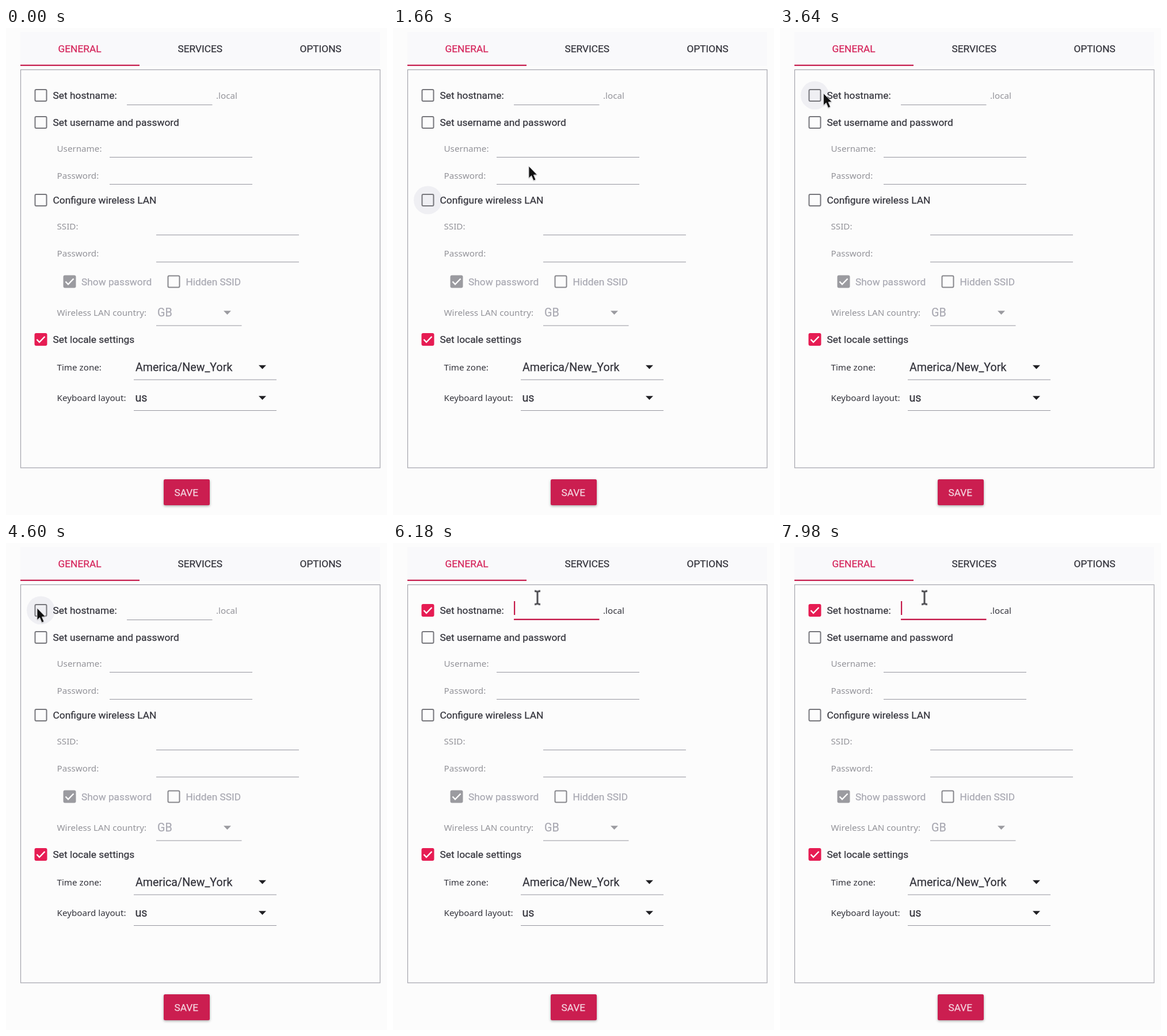
An HTML page with a canvas for the animation above (8000 ms loop, 662 by 846 pixels).

```html
<!DOCTYPE html>
<html lang="en">
<head>
<meta charset="utf-8">
<title>Settings form</title>
<style>
  html, body { margin: 0; width: 100%; height: 100%; overflow: hidden; background: #fcfcfc; }
  canvas { display: block; width: 662px; height: 846px; }
</style>
</head>
<body>
<canvas id="stage" width="662" height="846"></canvas>
<script>
const ctx = document.getElementById('stage').getContext('2d');
const LOOP = 8000, CLICK = 4760, BLINK = 600;
const PINK = '#e61c53', DEEP = '#c51a4a', INK = '#34343c', GREY = '#939399', RULE = '#96969f';
const ROBOTO = 'Roboto, sans-serif', NOTO = '"Noto Sans", sans-serif';

// Pointer waypoints: time, x, y
const PATH = [
  [300, 560, 850], [840, 400, 600], [1300, 300, 405], [1560, 252, 292],
  [1660, 236, 240], [2400, 184, 166], [2800, 152, 121], [3300, 104, 114],
  [3900, 54, 113], [5040, 54, 113], [5480, 158, 100], [5840, 232, 95],
  [6100, 251, 95], [LOOP, 251, 95]
];

// Hover halos: row centre, start, end
const HALOS = [[299, 1480, 1780], [164, 2380, 2860], [117, 2860, 5700]];

function text(s, x, y, size, color, family = ROBOTO, weight = 400) {
  ctx.font = `${weight} ${size}px ${family}`;
  ctx.fillStyle = color;
  ctx.fillText(s, x, y);
  if (family === ROBOTO) {
    ctx.strokeStyle = color;
    ctx.lineWidth = 0.25;
    ctx.strokeText(s, x, y);
  }
}

const row = (s, y) => text(s, 81.5, y, 17.35, INK);
const label = (s, x, y, color = GREY) => text(s, x, y, 15.2, color, NOTO, color === INK ? 500 : 400);

function rule(x1, x2, y, color = RULE, h = 1) {
  ctx.fillStyle = color;
  ctx.fillRect(x1, y, x2 - x1, h);
}

function poly(points, color) {
  ctx.beginPath();
  points.forEach(([x, y]) => ctx.lineTo(x, y));
  ctx.closePath();
  ctx.fillStyle = color;
  ctx.fill();
}

function box(x, y, fill, border = '#77777c') {
  ctx.beginPath();
  ctx.roundRect(x - 10, y - 10, 20, 20, 2);
  ctx.lineWidth = 2;
  ctx.strokeStyle = fill || border;
  ctx.lineJoin = 'round';
  ctx.stroke();
  if (!fill) return;
  ctx.fillStyle = fill;
  ctx.fill();
  ctx.beginPath();
  ctx.moveTo(x - 7, y);
  ctx.lineTo(x - 2.5, y + 4.8);
  ctx.lineTo(x + 7, y - 5);
  ctx.lineWidth = 2.4;
  ctx.lineJoin = 'miter';
  ctx.strokeStyle = '#fff';
  ctx.stroke();
}

function dropArrow(x, y, color) {
  poly([[x - 6.5, y - 3.2], [x + 6.5, y - 3.2], [x, y + 3.5]], color);
}

function tabs() {
  ctx.fillStyle = '#f9f9fb';
  ctx.fillRect(25, 7, 625, 59);
  text('GENERAL', 90.5, 42, 17.3, '#d5265c');
  text('SERVICES', 298.5, 42, 17.3, INK);
  text('OPTIONS', 510.5, 42, 17.3, INK);
  rule(25, 232, 63.7, DEEP, 2.2);
  ctx.strokeStyle = '#a4a4ac';
  ctx.lineWidth = 1.2;
  ctx.strokeRect(25.5, 72.5, 624.5, 691.5);
}

function halos(t) {
  for (const [y, from, to] of HALOS) {
    const a = Math.min((t - from) / 100, (to - t) / 60, 1);
    if (a <= 0) continue;
    ctx.globalAlpha = a;
    ctx.fillStyle = y === 117 && t >= CLICK ? '#fbe0e8' : '#efeff3';
    ctx.beginPath();
    ctx.arc(60.5, y, 24.5, 0, Math.PI * 2);
    ctx.fill();
    ctx.globalAlpha = 1;
  }
}

function form(t) {
  const on = t >= CLICK;
  box(60.5, 117, on && PINK);
  row('Set hostname:', 122.5);
  if (on) {
    rule(210, 358.5, 131.6, DEEP, 2.4);
    if ((t - CLICK) % BLINK < BLINK / 2) rule(210, 212.2, 101, DEEP, 24);
  } else {
    rule(210, 358.5, 133);
  }
  label('.local', 365, 123, on ? INK : GREY);

  box(60.5, 164);
  row('Set username and password', 169.5);
  label('Username:', 88.5, 215);
  rule(180, 428, 224);
  label('Password:', 88.5, 262);
  rule(180, 428, 271);

  box(60.5, 299);
  row('Configure wireless LAN', 305);
  label('SSID:', 88.5, 350);
  rule(261, 509, 359);
  label('Password:', 88.5, 397);
  rule(261, 509, 406);
  box(110.5, 440.5, '#9b9ba0');
  text('Show password', 131, 446.5, 17.3, '#a9a9b2');
  box(291.5, 440.5, null, '#87878c');
  text('Hidden SSID', 312.5, 446.5, 17.3, '#a9a9b2');
  label('Wireless LAN country:', 88.5, 500);
  text('GB', 263, 501, 19.7, '#a9a9b2');
  dropArrow(384.5, 494.5, '#9b9ba0');
  rule(261, 409.5, 516.5);

  box(60.5, 541, PINK);
  row('Set locale settings', 547);
  label('Time zone:', 88.5, 595, INK);
  text('America/New_York', 225, 595.5, 19.7, INK);
  dropArrow(445.5, 589, '#202024');
  rule(222, 470, 610.5);
  label('Keyboard layout:', 88.5, 648, INK);
  text('us', 224.5, 649, 19.7, INK);
  dropArrow(445.5, 642.5, '#202024');
  rule(222, 470, 664);
}

function saveButton() {
  ctx.save();
  ctx.shadowColor = 'rgba(0,0,0,.35)';
  ctx.shadowBlur = 4;
  ctx.shadowOffsetY = 1.5;
  ctx.fillStyle = '#cb1e50';
  ctx.beginPath();
  ctx.roundRect(274, 784, 80, 45, 2.5);
  ctx.fill();
  ctx.restore();
  text('SAVE', 292.5, 812.5, 17.3, '#f3d3de');
}

function pointerAt(t) {
  const i = PATH.findIndex(p => p[0] > t);
  if (i < 1) return null;
  const [t0, x0, y0] = PATH[i - 1], [t1, x1, y1] = PATH[i];
  const k = (t - t0) / (t1 - t0);
  return [x0 + (x1 - x0) * k, y0 + (y1 - y0) * k];
}

function arrow() {
  const shape = [[0, 0], [0, 21], [4.6, 16.6], [8.2, 25.2], [12, 23.6], [8.5, 15.3], [14.5, 15]];
  ctx.save();
  ctx.shadowColor = 'rgba(0,0,0,.3)';
  ctx.shadowBlur = 2;
  ctx.shadowOffsetY = 1;
  poly(shape, '#111');
  ctx.restore();
  ctx.lineWidth = 0.9;
  ctx.lineJoin = 'round';
  ctx.strokeStyle = '#e8e8ec';
  ctx.stroke();
}

function beam() {
  const stroke = (color, width) => {
    ctx.beginPath();
    for (const s of [-1, 1]) {
      ctx.moveTo(-5, 11.5 * s);
      ctx.quadraticCurveTo(0, 11.5 * s, 0, 8.5 * s);
      ctx.quadraticCurveTo(0, 11.5 * s, 5, 11.5 * s);
    }
    ctx.moveTo(0, -9);
    ctx.lineTo(0, 9);
    ctx.lineWidth = width;
    ctx.strokeStyle = color;
    ctx.stroke();
  };
  stroke('#c8c8cc', 4.6);
  stroke('#4c4c50', 2.4);
}

function pointer(t) {
  const p = pointerAt(t);
  if (!p) return;
  ctx.save();
  ctx.translate(...p);
  if (t > CLICK && p[0] >= 210) beam();
  else arrow();
  ctx.restore();
}

function draw(now) {
  const t = now % LOOP;
  ctx.fillStyle = '#fcfcfc';
  ctx.fillRect(0, 0, 662, 846);
  tabs();
  halos(t);
  form(t);
  saveButton();
  pointer(t);
}

const start = performance.now();
function tick() {
  draw(performance.now() - start);
  requestAnimationFrame(tick);
}
tick();
</script>
</body>
</html>
```
